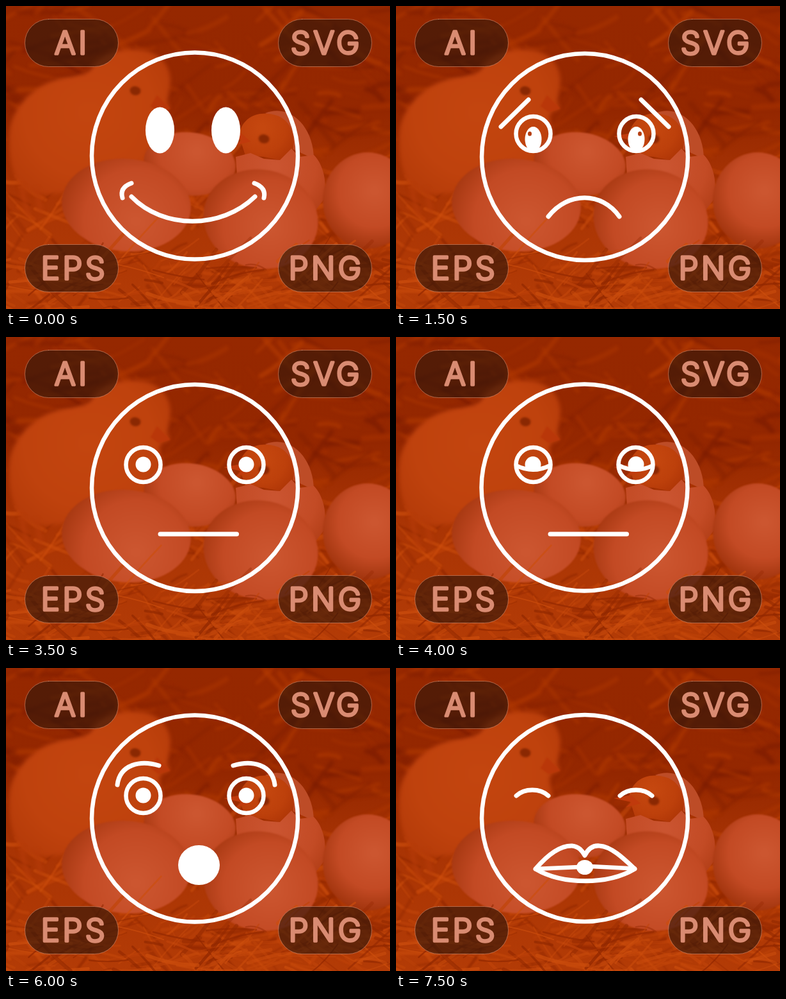
An HTML page with a canvas for the animation above (8 s loop, 600x472 px).

```html
<!DOCTYPE html>
<html lang="en">
<head>
<meta charset="utf-8">
<title>Emoticon set</title>
<style>
html, body { margin: 0; width: 100%; height: 100%; overflow: hidden; background: #9c2c02; }
canvas { display: block; }
</style>
</head>
<body>
<canvas id="stage" width="600" height="472"></canvas>
<script>
const W = 600, H = 472, TAU = Math.PI * 2;
const ctx = document.getElementById('stage').getContext('2d');
const backdrop = document.createElement('canvas');
backdrop.width = W;
backdrop.height = H;

let seed = 17;
function random(min, max) {
  seed = (seed * 16807) % 2147483647;
  return min + (max - min) * seed / 2147483647;
}

// ---------- Backdrop ----------
function straw(g, count, top, bottom, colors, maxWidth, alpha) {
  g.lineCap = 'round';
  for (let i = 0; i < count; i++) {
    const x = random(-60, W + 30), y = random(top, bottom);
    const angle = random(-1, 1), length = random(25, 100);
    const dx = Math.cos(angle) * length, dy = Math.sin(angle) * length;
    g.globalAlpha = random(alpha * 0.4, alpha);
    g.strokeStyle = colors[Math.floor(random(0, colors.length))];
    g.lineWidth = random(1.5, maxWidth);
    g.beginPath();
    g.moveTo(x, y);
    g.quadraticCurveTo(x + dx / 2, y + dy / 2 + random(-9, 9), x + dx, y + dy);
    g.stroke();
  }
  g.globalAlpha = 1;
}

function shade(g, x, y, radius, light, mid, dark) {
  const fill = g.createRadialGradient(x, y, 5, x, y, radius);
  fill.addColorStop(0, light);
  fill.addColorStop(0.6, mid);
  fill.addColorStop(1, dark);
  return fill;
}

// glow places the light: -1 at the top edge, 1 at the bottom edge.
function egg(g, x, y, rx, ry, tilt, glow) {
  g.fillStyle = shade(g, x + rx * 0.15, y + ry * glow, rx * 1.3, '#cc5630', '#c34a24', '#a2350e');
  g.beginPath();
  g.ellipse(x, y, rx, ry, tilt, 0, TAU);
  g.fill();
}

function eyeSpot(g, x, y) {
  g.filter = 'blur(1.5px)';
  g.fillStyle = '#8a2802';
  g.beginPath();
  g.ellipse(x, y, 8.5, 7, 0.2, 0, TAU);
  g.fill();
  g.filter = 'none';
}

function fillPath(g, d, fill) {
  g.fillStyle = fill;
  g.fill(new Path2D(d));
}

function drawBigChick(g) {
  g.filter = 'blur(3px)';
  fillPath(g, 'M132 100C144 77 170 66 205 68C238 69 257 91 257 117L252 150L257 160L244 165' +
    'C235 174 245 185 244 205C239 246 190 268 145 274C108 291 62 299 32 289' +
    'C10 271 3 237 5 199C8 164 34 132 70 118C95 108 116 112 132 100Z',
    shade(g, 130, 165, 165, '#c3450f', '#bf420d', '#b33a08'));
  g.strokeStyle = '#b43a08';
  g.lineWidth = 6;
  g.stroke(new Path2D('M24 282L34 325M48 288L54 318'));
  g.filter = 'blur(1px)';
  fillPath(g, 'M236 139L257 160L238 165L226 156Z', '#b93709');
  eyeSpot(g, 202, 132);
}

function drawHatchling(g) {
  g.filter = 'blur(0.7px)';
  fillPath(g, 'M405 167C445 151 481 190 481 238L448 223L437 183Z', '#bd4c27');
  fillPath(g, 'M364 202C368 175 391 163 417 169C444 174 454 201 448 226L432 241L403 235L374 233Z',
    shade(g, 400, 190, 60, '#c5470f', '#bd400b', '#ae3506'));
  fillPath(g, 'M340 203L367 198L382 211L359 217L368 209Z', '#c03a0c');
  fillPath(g, 'M359 235L382 229L403 238L428 240L446 222L458 235L481 232' +
    'C496 247 503 276 496 302L475 330L362 281Z',
    shade(g, 420, 250, 105, '#ca5430', '#c34b25', '#ae3b14'));
  eyeSpot(g, 403, 207);
}

function label(g, text, x, y, inkLeft) {
  g.fillStyle = 'rgba(42, 20, 10, .6)';
  g.strokeStyle = 'rgba(230, 155, 125, .55)';
  g.lineWidth = 1;
  g.beginPath();
  g.roundRect(x + 0.5, y + 0.5, 146, 74, 37);
  g.fill();
  g.stroke();

  g.font = '300 49px Inter, sans-serif';
  g.letterSpacing = '4.5px';
  g.textAlign = 'left';
  g.fillStyle = g.strokeStyle = '#d98b72';
  g.lineWidth = 3.5;
  g.lineJoin = 'round';
  const left = inkLeft + 1.75 + g.measureText(text).actualBoundingBoxLeft;
  g.fillText(text, left, y + 55);
  g.strokeText(text, left, y + 55);
}

function drawBackdrop(g) {
  const ground = g.createLinearGradient(0, 0, 0, H);
  ground.addColorStop(0, '#962800');
  ground.addColorStop(0.35, '#942700');
  ground.addColorStop(0.6, '#a93404');
  ground.addColorStop(1, '#b33b06');
  g.fillStyle = ground;
  g.fillRect(0, 0, W, H);

  g.filter = 'blur(2.5px)';
  straw(g, 170, -10, 250, ['#b83e02', '#7e1d00', '#ae3701'], 9, 0.75);
  g.filter = 'blur(0.8px)';
  straw(g, 220, 255, 480, ['#cc4e0d', '#922800', '#c2450a'], 7, 0.7);
  g.filter = 'none';

  drawBigChick(g);
  g.filter = 'blur(1px)';
  egg(g, 287, 246, 72, 49, 0.12, -0.4);
  g.filter = 'none';
  drawHatchling(g);
  g.filter = 'blur(1px)';
  egg(g, 565, 303, 70, 75, 0, -0.2);
  egg(g, 188, 310, 101, 72, 0.08, 0.35);
  egg(g, 398, 332, 90, 77, 0.2, 0.15);
  g.filter = 'blur(0.6px)';
  straw(g, 170, 385, 485, ['#cc4e0e', '#922800', '#c1450b'], 6, 0.75);
  g.filter = 'none';

  label(g, 'AI', 29, 20, 75);
  label(g, 'SVG', 425, 20, 446);
  label(g, 'EPS', 29, 371, 57);
  label(g, 'PNG', 425, 371, 444);
}

// ---------- Face parts ----------
function line(d, width = 7) {
  ctx.lineWidth = width;
  ctx.stroke(new Path2D(d));
}

function blob(x, y, rx, ry = rx, color = '#fff') {
  ctx.fillStyle = color;
  ctx.beginPath();
  ctx.ellipse(x, y, rx, ry, 0, 0, TAU);
  ctx.fill();
}

// Draws a left part and its reflection; span is twice the axis position.
function pair(draw, span = 590) {
  draw();
  ctx.save();
  ctx.transform(-1, 0, 0, 1, span, 0);
  draw();
  ctx.restore();
}

function ringEyes(pupil, span) {
  pair(() => {
    ctx.save();
    ctx.beginPath();
    ctx.arc(214.5, 199, 27, 0, TAU);
    ctx.lineWidth = 6.5;
    ctx.stroke();
    ctx.clip();
    pupil();
    ctx.restore();
  }, span);
}

function halfPupil(clipPath) {
  ctx.save();
  ctx.clip(new Path2D(clipPath));
  blob(214, 198.5, 12.5);
  ctx.restore();
}

const eyes = {
  oval() {
    blob(240.5, 193.5, 22.5, 36);
    blob(343.5, 193.5, 22.5, 36);
  },
  teary: () => ringEyes(() => {
    blob(214.5, 207.5, 13, 19.5);
    blob(209, 199, 3, 3.5, '#b53e12');
  }),
  round: () => ringEyes(() => blob(214.5, 198.5, 12)),
  raised: () => ringEyes(() => {
    line('M187 200Q214 213.5 241 200', 6.5);
    halfPupil('M180 160H250V200Q214 214 180 200Z');
  }, 589),
  tired: () => ringEyes(() => {
    line('M188 198.5H241', 6);
    halfPupil('M180 198H250V230H180Z');
  }),
  closed: () => pair(() => line('M188 199C201 187 225 187 238 199'), 588)
};

const brows = {
  none() {},
  worried: () => pair(() => line('M164 188L207 146')),
  flat: () => line('M183.5 156.5H241M344.5 156.5H402'),
  arched: () => pair(() => line('M174 182C178 150 210 143 239 152'), 594)
};

const mouths = {
  smile() {
    line('M196 297C246 348 336 348 389 297');
    line('M196 276Q177 283 182 299M388 276Q407 283 403 299');
  },
  frown: () => line('M238 328C268 289 322 289 349 328'),
  laugh: () => line('M238 293H361C361 330 335 354.5 300 354.5C264 354.5 238 330 238 293Z', 6.5),
  straight: () => line('M241 307H360.5'),
  low: () => line('M241 318H348.5'),
  gasp: () => blob(301.5, 307, 32.5, 31),
  lips() {
    line('M218 313C236 292 256 276.5 275 277C286 278 291 285 295 292' +
      'C300 282 308 276 318 277C336 278 355 296 373 313C331 338 260 338 218 313Z', 7);
    line('M218 313L286 310M304 309L373 312.5', 6.5);
    blob(295, 310.5, 13, 11.5);
  }
};

// Each face: duration in ms, eyes, brows, mouth, head centre.
const faces = [
  [500, 'oval', 'none', 'smile', 295, 233.5],
  [500, 'round', 'none', 'smile', 295, 235],
  [500, 'round', 'worried', 'frown', 295, 235],
  [500, 'teary', 'worried', 'frown', 295, 235],
  [500, 'teary', 'none', 'laugh', 295, 235],
  [1000, 'round', 'none', 'laugh', 295, 235],
  [500, 'round', 'none', 'straight', 295, 235],
  [500, 'raised', 'none', 'straight', 294.5, 234.5],
  [500, 'tired', 'none', 'straight', 295, 234.5],
  [500, 'tired', 'flat', 'low', 295, 234.5],
  [500, 'round', 'flat', 'low', 295, 234.5],
  [500, 'round', 'arched', 'gasp', 295, 234.5],
  [500, 'closed', 'arched', 'gasp', 295, 234.5],
  [500, 'round', 'none', 'lips', 295, 234.5],
  [500, 'closed', 'none', 'lips', 295, 234]
];
const LOOP = faces.reduce((sum, face) => sum + face[0], 0);

function faceAt(time) {
  let end = 0;
  return faces.find(face => time < (end += face[0]));
}

function render(now) {
  const [, eye, brow, mouth, x, y] = faceAt(now % LOOP);
  ctx.drawImage(backdrop, 0, 0);
  ctx.strokeStyle = '#fff';
  ctx.lineCap = ctx.lineJoin = 'round';
  ctx.lineWidth = 6.5;
  ctx.beginPath();
  ctx.arc(x, y, 161, 0, TAU);
  ctx.stroke();
  brows[brow]();
  eyes[eye]();
  mouths[mouth]();
}

drawBackdrop(backdrop.getContext('2d'));
const start = performance.now();
function tick() {
  render(performance.now() - start);
  requestAnimationFrame(tick);
}
tick();
</script>
</body>
</html>
```
